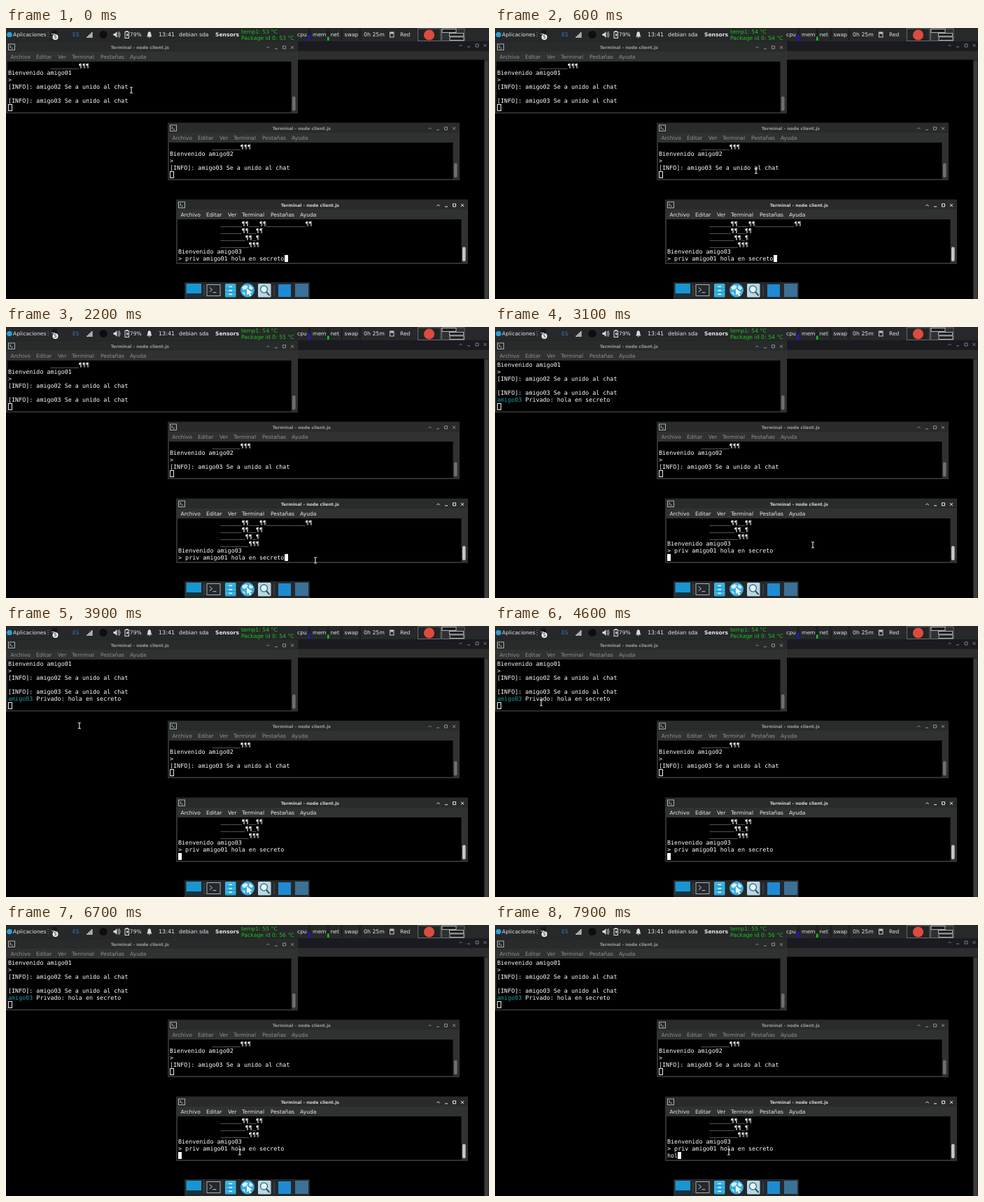
Animation of 690 by 388 pixels, one loop 8 s. Source, as an HTML page:

```html
<!DOCTYPE html>
<html lang="es">
<head>
<meta charset="utf-8">
<title>Chat</title>
<style>
html, body { margin: 0; width: 100%; height: 100%; overflow: hidden; background: #000; }
svg { display: block; width: 690px; height: 388px; }
text { font: 7.6px "DejaVu Sans", sans-serif; fill: #e4e4e4; white-space: pre; text-rendering: geometricPrecision; }
.mono { font: 8.4px "DejaVu Sans Mono", monospace; fill: #fff; }
.title { font-size: 6.15px; font-weight: bold; text-anchor: middle; }
.line { fill: none; stroke: #ddd; }
</style>
</head>
<body>
<svg id="stage" viewBox="0 0 690 388"></svg>
<script>
const CHAR = 5.057, ROW = 10;
const PANEL = '#262829', TITLE = '#292a2a', MENU = '#303131';

const rect = (x, y, w, h, fill, more = '') =>
  `<rect x="${x}" y="${y}" width="${w}" height="${h}" fill="${fill}" ${more}/>`;
const circle = (x, y, r, fill) => `<circle cx="${x}" cy="${y}" r="${r}" fill="${fill}"/>`;
const text = (x, y, s, more = '') => `<text x="${x}" y="${y}" ${more}>${s}</text>`;
const line = (d, color = '#ddd', width = 1) =>
  `<path class="line" d="${d}" style="stroke:${color};stroke-width:${width}"/>`;
const shape = (d, fill = '#ddd') => `<path d="${d}" fill="${fill}"/>`;

function promptIcon(x, y, w, h) {
  return rect(x, y, w, h, '#23282c', 'stroke="#b9c0c4" stroke-width=".9"') +
    line(`M${x + w * .2} ${y + h * .25}l${w * .2} ${h * .2}l${-w * .2} ${h * .2}M${x + w * .45} ${y + h * .7}h${w * .25}`, '#ddd', .9);
}

function buttons([a, b, c, d], y, color) {
  return line(`M${a - 2} ${y + 1}l2 -2l2 2M${b - 2} ${y + 2}h4M${c - 2} ${y - 2}h4v4h-4zM${d - 2} ${y - 2}l4 4m0 -4l-4 4`, color);
}

function terminal(id, x, y, h, active) {
  const ink = active ? '#ececec' : '#909293';
  const style = `style="fill:${ink}"`;
  const menu = [['Archivo', 5.5], ['Editar', 42], ['Ver', 73], ['Terminal', 93], ['Pestañas', 134], ['Ayuda', 176]];
  return rect(x - .5, y, 416, h, MENU, 'stroke="#3a3b3b" stroke-width=".7"') +
    rect(x - .5, y, 416, 14, TITLE) +
    rect(x + 1, y + 28, 405.5, h - 29.5, '#000') +
    rect(x + 408, y + h - 24, 4.6, 20.5, active ? '#c4c6c7' : '#6c6f70', 'rx="2"') +
    promptIcon(x + 2.5, y + 3, 9, 8.5) +
    text(x + 190.3, y + 9.8, 'Terminal - node client.js', `class="title" style="fill:${active ? '#d2d4d5' : '#9a9c9d'}"`) +
    buttons([x + 373.5, x + 385, x + 396.5, x + 408], y + 7.8, ink) +
    menu.map(([s, dx]) => text(x + dx, y + 23.8, s, style)).join('') +
    `<g id="${id}"></g>`;
}

// Lines of a terminal; the cursor follows the last one.
function screen(x, y, lines, solid) {
  const rows = lines.map((s, i) => text(x, y + i * ROW, s, 'class="mono"')).join('');
  const cx = Math.round(x + lines[lines.length - 1].length * CHAR);
  const cy = y + (lines.length - 1) * ROW - 8;
  return rows + (solid ? rect(cx, cy, 5, 10, '#fff')
    : rect(cx + .5, cy + .5, 5, 9, 'none', 'stroke="#eee"'));
}

function panel() {
  const minis = [[1, 1, 20, 5], [11.5, 7, 20, 4.3], [12, 12.4, 20, 4.6]];
  return rect(0, 0, 690, 19.5, PANEL) +
    circle(5, 9.5, 3.8, '#2a9fd6') + text(10, 12.2, 'Aplicaciones') +
    [6, 9, 12].map(y => rect(59.6, y, 1, 1, '#999')).join('') +
    rect(66, 3, 7, 6, '#15181a') + line('M65 8.5h5', '#ddd', .8) + circle(70.5, 13, 4, '#eee') +
    text(70.5, 15.4, '5', 'text-anchor="middle" style="font-size:6.5px;fill:#111"') +
    text(95, 12.4, 'ES', 'style="fill:#3d78c8"') +
    [0, 1, 2, 3].map(i => rect(115.5 + i * 2.1, 12 - i * 2, 1.6, 2 + i * 2, '#ddd')).join('') +
    circle(139, 9.5, 5.6, '#0f0d0d') +
    shape('M153.5 8h2l3-3v9l-3-3h-2z') + line('M160 6.5q2 3 0 6M161.5 5q3 4.5 0 9', '#ddd', .9) +
    rect(170, 5.5, 5.5, 9, 'none', 'stroke="#ddd"') + rect(171.5, 4, 2.5, 1.5, '#ddd') +
    shape('M173.5 6.5l-2 4h1.5l-.5 3l2.5-4.5h-1.5z') +
    text(176.8, 12.4, '79%') +
    shape('M201 12.5q1.5-1.5 1.5-4.5q0-2.5 2.3-3q2.3.5 2.3 3q0 3 1.5 4.5zM203.5 13.3h2.6q-1.3 1.8-2.6 0z') +
    text(218, 12.4, '13:41', 'style="font-size:8px"') + text(247, 12.4, 'debian sda', 'style="font-size:7.75px"') +
    text(299, 12.4, 'Sensors', 'style="font-weight:bold"') +
    '<g id="temps"></g>' +
    text(416, 12.4, 'cpu') + rect(432, 1, 3, 17, '#1c1e1f') + rect(432, 10, 2.5, 8, '#1818e0') +
    text(438, 12.4, 'mem') + rect(458.5, 1, 3, 17, '#1c1e1f') + rect(459, 12.5, 2.5, 5.5, '#18c818') +
    text(463.5, 12.4, 'net') + rect(478.5, 1, 2.5, 17, '#1c1e1f') +
    text(483.5, 12.4, 'swap') + rect(504.5, 1, 2.5, 17, '#1c1e1f') +
    text(511, 12.4, '0h 25m', 'style="font-size:7.8px"') +
    rect(548.5, 6, 5.5, 7, 'none', 'stroke="#ccc"') + rect(549.5, 6, 3.5, 2.5, '#ccc') +
    text(563, 12.4, 'Red') +
    rect(588.5, 1, 32.5, 17.5, '#222425', 'stroke="#85898b" stroke-width=".7"') +
    circle(604.5, 10, 7.6, '#dd4b3e') +
    rect(622.5, 1, 32.5, 17.5, '#2e3031', 'stroke="#85898b" stroke-width=".7"') +
    minis.map(([x, y, w, h]) => rect(622 + x, y + .5, w, h, '#1c1e20', 'stroke="#d0d2d3" stroke-width=".8"')).join('');
}

function dock() {
  const sep = x => line(`M${x} 368v16`, '#55595b', .8);
  return rect(255, 364, 179, 24, '#25282a') +
    rect(257.5, 366, 21.5, 19, '#1796d2') + rect(257.5, 380, 21.5, 5, '#16323f') + sep(283) +
    promptIcon(287, 367.5, 19, 16) +
    rect(313, 366, 15.5, 19.5, '#38b3e3', 'rx="1.5"') +
    [370.5, 376, 381.5].map(y => line(`M314 ${y + 2.5}h13.5`, '#1c7fa9', .7) + rect(318.5, y - 1, 4.5, 1.6, '#e8f6fc')).join('') +
    circle(345, 375.5, 10, '#36ace0') +
    shape('M337 371l5-3l4 2l-3 4l-4 1zM348 368l5 4l-2 3l-4-2zM337 378l4 1l1 4z', '#d6effa') +
    shape('M344 373l8 6l-3.5.5l2 4l-2 1l-2-4l-2.5 2z', '#fff') +
    rect(360, 366, 18.5, 19.5, '#b9d7e4', 'rx="1.5"') +
    '<circle cx="368.5" cy="374" r="5" fill="#e9f6fb" stroke="#3c7894" stroke-width="1.5"/>' +
    line('M372 378l4.5 5', '#34505c', 2) +
    sep(383) + rect(389, 367, 18, 18, '#1f8ad2') + rect(413, 366, 19, 19, '#3b7196');
}

function desktop() {
  return rect(0, 19.5, 690, 13, '#1a1a20') + rect(0, 32.5, 690, 13, '#2c2d2d') +
    rect(683, 45.5, 7, 342.5, '#2c2d2d') + rect(684.3, 47, 4.4, 341, '#3c3d3d', 'rx="2"') +
    buttons([649.5, 661, 673, 684.5], 25, '#7d7d8a') +
    panel() +
    terminal('term1', 1, 20, 102, false) +
    terminal('term2', 232, 136, 81.5, false) +
    terminal('term3', 244, 246, 91.5, true) +
    dock() + '<g id="pointer"></g>';
}

const $ = id => document.getElementById(id);
$('stage').innerHTML = desktop();

const art = (n, s) => ' '.repeat(12) + '_'.repeat(n) + s;
const artEnd = art(8, '¶¶¶');
const hello = n => 'Bienvenido amigo0' + n;
const joined = n => `[INFO]: amigo0${n} Se a unido al chat`;
const command = '> priv amigo01 hola en secreto';
const secret = '<tspan fill="#20a0a4">amigo03</tspan> Privado: hola en secreto';
const log1 = [artEnd, hello(1), '>', joined(2), '', joined(3)];
const log3 = [art(6, '¶¶___¶¶___________¶¶'), art(6, '¶¶__¶¶'), art(7, '¶¶_¶'), artEnd, hello(3), command];

$('term2').innerHTML = screen(234, 173, [artEnd, hello(2), '>', joined(3), '']);

// time, x, y
const path = [
  [0, 179, 89], [100, 179, 89], [900, 462, 257], [1400, 462, 257], [2000, 442, 334], [2300, 442, 334],
  [2900, 454, 312], [3200, 454, 312], [3700, 190, 180], [4100, 21, 106], [4300, 14, 108],
  [4600, 66, 110], [4800, 120, 112], [5000, 200, 163], [5350, 385, 331], [5500, 385, 331], [5900, 334, 325], [8000, 334, 325]
];
// time, first sensor, second sensor
const temps = [[0, 53, 53], [600, 54, 54], [1200, 54, 55], [2500, 54, 54], [4900, 55, 55], [5200, 55, 56]];
const keys = [6900, 7300, 7700];

function pointerAt(t) {
  const i = path.findIndex(p => p[0] > t);
  const [a, b] = [path[i - 1], path[i]];
  const u = (t - a[0]) / (b[0] - a[0]), e = u * u * (3 - 2 * u);
  return [a[1] + (b[1] - a[1]) * e, a[2] + (b[2] - a[2]) * e];
}

const onBar = (x, y) => [[1, 20], [232, 136], [244, 246]]
  .some(([wx, wy]) => x > wx && x < wx + 415 && y > wy && y < wy + 28);

function put(id, html) {
  const el = $(id);
  if (el.last !== html) el.innerHTML = el.last = html;
}

function draw() {
  const t = performance.now() % 8000, sent = t >= 3100;
  put('term1', screen(3, 57, sent ? [...log1.slice(1), secret, ''] : [...log1, '']));
  put('term3', screen(246, 283, sent
    ? [...log3.slice(1), 'hol'.slice(0, keys.filter(k => k <= t).length)]
    : log3, true));

  const [, a, b] = temps.filter(s => s[0] <= t).pop();
  const green = 'style="fill:#1fc21f;font-size:7.75px"';
  put('temps', text(336, 7.8, `temp1: ${a} °C`, green) + text(336, 17.4, `Package id 0: ${b} °C`, green));

  const [x, y] = pointerAt(t);
  put('pointer', onBar(x, y)
    ? `<path d="M${x} ${y - 4}v8.5l2-1.8l1.5 3l1.3-.6l-1.4-3h2.6z" fill="#111" stroke="#eee" stroke-width=".8"/>`
    : line(`M${x - 2} ${y - 4.2}q2 0 2 1.2v6q0 1.2 -2 1.2M${x + 2} ${y - 4.2}q-2 0 -2 1.2v6q0 1.2 2 1.2`, '#e6e6e6', 1.1));
  requestAnimationFrame(draw);
}
draw();
</script>
</body>
</html>
```
